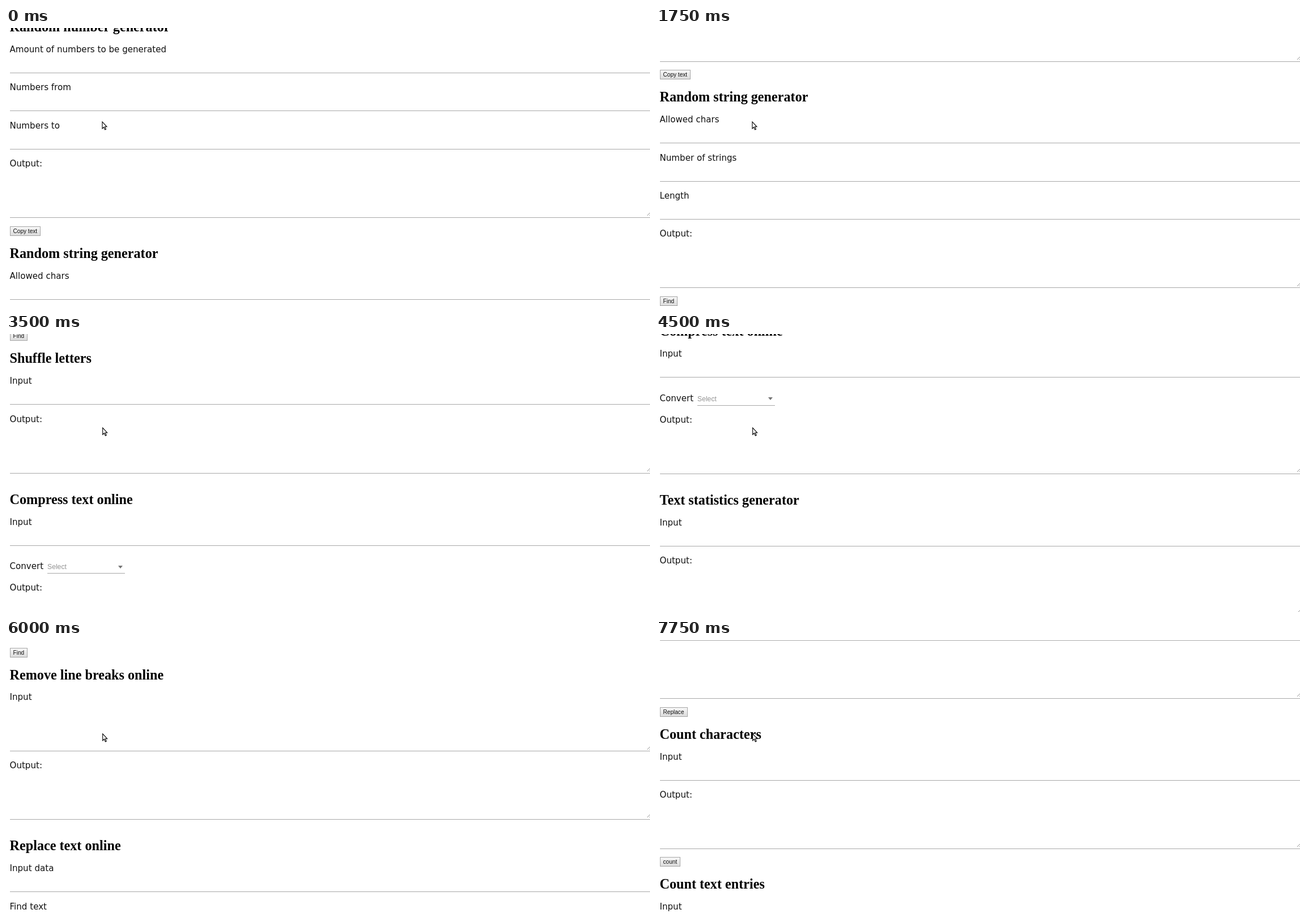
These frames come from a looping animation (1137 px wide and 492 px high, 8000 ms). An HTML page:

```html
<!DOCTYPE html>
<html lang="en">
<head>
<meta charset="utf-8">
<title>Text tools</title>
<style>
  html, body { margin: 0; width: 100%; height: 100%; overflow: hidden; background: #fff; }
  #stage { position: relative; width: 1137px; height: 492px; overflow: hidden; background: #fff; }
  #stage > * { position: absolute; left: 6.5px; top: 0; margin: 0; white-space: nowrap; box-sizing: border-box; }
  .title { font: bold 24.2px/28px "Liberation Serif", "Times New Roman", serif; color: #000; }
  .label { font: 15.1px/20px "DejaVu Sans", Verdana, sans-serif; color: #111; }
  .line { width: 1131px; height: 1px; background: #a8a8a8; }
  .button {
    height: 17px; padding: 0 5px; border: 1px solid #a6a6a6;
    background: linear-gradient(#f7f7f7, #dcdcdc);
    font: 10.1px/15px "Liberation Sans", Arial, sans-serif; color: #111;
  }
  #stage > .choice { left: 73px; font: 12.2px/16px "Liberation Sans", Arial, sans-serif; color: #949494; }
  #stage > .rule { left: 73px; width: 137px; height: 1px; background: #a8a8a8; }
  #stage > .arrow { left: 198px; border: solid transparent; border-width: 5px 4.7px 0; border-top-color: #757575; }
  #stage > .grip { left: 1131px; }
  #stage > #cursor { left: 169px; top: 164.6px; }
</style>
</head>
<body>
<div id="stage">
  <svg id="cursor" width="12" height="18" viewBox="0 0 12 18">
    <path d="M1 1V13L3.7 10.5L5.7 15L7.5 14.2L5.6 9.8H9Z" fill="#fff" stroke="#000" stroke-width="1.1"/>
  </svg>
</div>
<script>
const stage = document.getElementById('stage');
const cursor = document.getElementById('cursor');
const items = [];
let y = 0; // centre of the most recently placed row

function place(cls, center, height, content = '') {
  const el = document.createElement('div');
  el.className = cls;
  el.innerHTML = content;
  stage.insertBefore(el, cursor);
  items.push({ el, top: center - height / 2 });
}

function add(cls, gap, height, content) {
  y += gap;
  place(cls, y, height, content);
}

const GRIP = '<svg width="6" height="8" style="display:block">' +
  '<path d="M1 7L6 2M4.5 7L6 5.5" stroke="#8a8a8a" stroke-width=".9"/></svg>';

const AFTER_FIELD = 25.9, AFTER_AREA = 25.4, AFTER_TITLE = 39.9;
const TITLE_AFTER_BUTTON = 39.5, TITLE_AFTER_AREA = 46.8;

const line = gap => add('line', gap, 1);
const label = (text, gap = AFTER_FIELD) => add('label', gap, 20, text);
const button = text => add('button', 23.7, 17, text);

function title(text, gap) {
  add('title', gap, 28, text);
  y += AFTER_TITLE - AFTER_FIELD; // the first label sits lower under a title
}
function field(text) {
  label(text);
  line(41.5);
}
function area(gap = 95.3) {
  line(gap);
  place('grip', y - 6, 8, GRIP);
}
function output(gap) {
  label('Output:', gap);
  area();
}

title('Random number generator', -1.95);
['Amount of numbers to be generated', 'Numbers from', 'Numbers to'].forEach(field);
output();
button('Copy text');

title('Random string generator', TITLE_AFTER_BUTTON);
['Allowed chars', 'Number of strings', 'Length'].forEach(field);
output();
button('Find');

title('Shuffle letters', TITLE_AFTER_BUTTON);
field('Input');
output();

title('Compress text online', TITLE_AFTER_AREA);
field('Input');
label('Convert', 37.1);
place('choice', y + 1, 16, 'Select');
place('arrow', y + 1, 5);
place('rule', y + 12.4, 1);
output(38);

title('Text statistics generator', TITLE_AFTER_AREA);
field('Input');
output();
button('Find');

title('Remove line breaks online', TITLE_AFTER_BUTTON);
label('Input');
area();
output(AFTER_AREA);

title('Replace text online', TITLE_AFTER_AREA);
['Input data', 'Find text', 'Replace with'].forEach(field);
area(102.8);
button('Replace');

title('Count characters', TITLE_AFTER_BUTTON);
field('Input');
output();
button('count');

title('Count text entries', TITLE_AFTER_BUTTON);
field('Input');

// Scroll offset by step, joined by a smooth curve
const KEYS = [[0, 0], [6, 276.3], [9, 454.5], [13, 755.8], [20, 1287.3], [26, 1817.6], [30, 2131.3]];
const LOOP = 8000, START = 500, STEP = 250;

const slope = i => (KEYS[i + 1][1] - KEYS[i][1]) / (KEYS[i + 1][0] - KEYS[i][0]);
function tangent(i) {
  if (i === 0) return 38;
  if (i === KEYS.length - 1) return slope(i - 1);
  return (slope(i - 1) + slope(i)) / 2;
}

function scrollAt(step) {
  let i = 0;
  while (i < KEYS.length - 2 && step >= KEYS[i + 1][0]) i++;
  const [k0, s0] = KEYS[i], [k1, s1] = KEYS[i + 1];
  const d = k1 - k0, u = (step - k0) / d, v = 1 - u;
  return s0 * v * v * (1 + 2 * u) + s1 * u * u * (1 + 2 * v)
    + d * u * v * (tangent(i) * v - tangent(i + 1) * u);
}

let shown = -1;
function render(now) {
  const t = now % LOOP;
  const step = t < START ? 0 : Math.floor((t - START) / STEP) + 1;
  if (step !== shown) {
    shown = step;
    const offset = scrollAt(step);
    for (const { el, top } of items) {
      el.style.transform = `translateY(${Math.round(top - offset)}px)`;
    }
    cursor.style.transform = `translateX(${step > 6 ? 0.7 : 0}px)`;
  }
}

const begin = performance.now();
function tick() {
  render(performance.now() - begin);
  requestAnimationFrame(tick);
}
tick();
</script>
</body>
</html>
```
